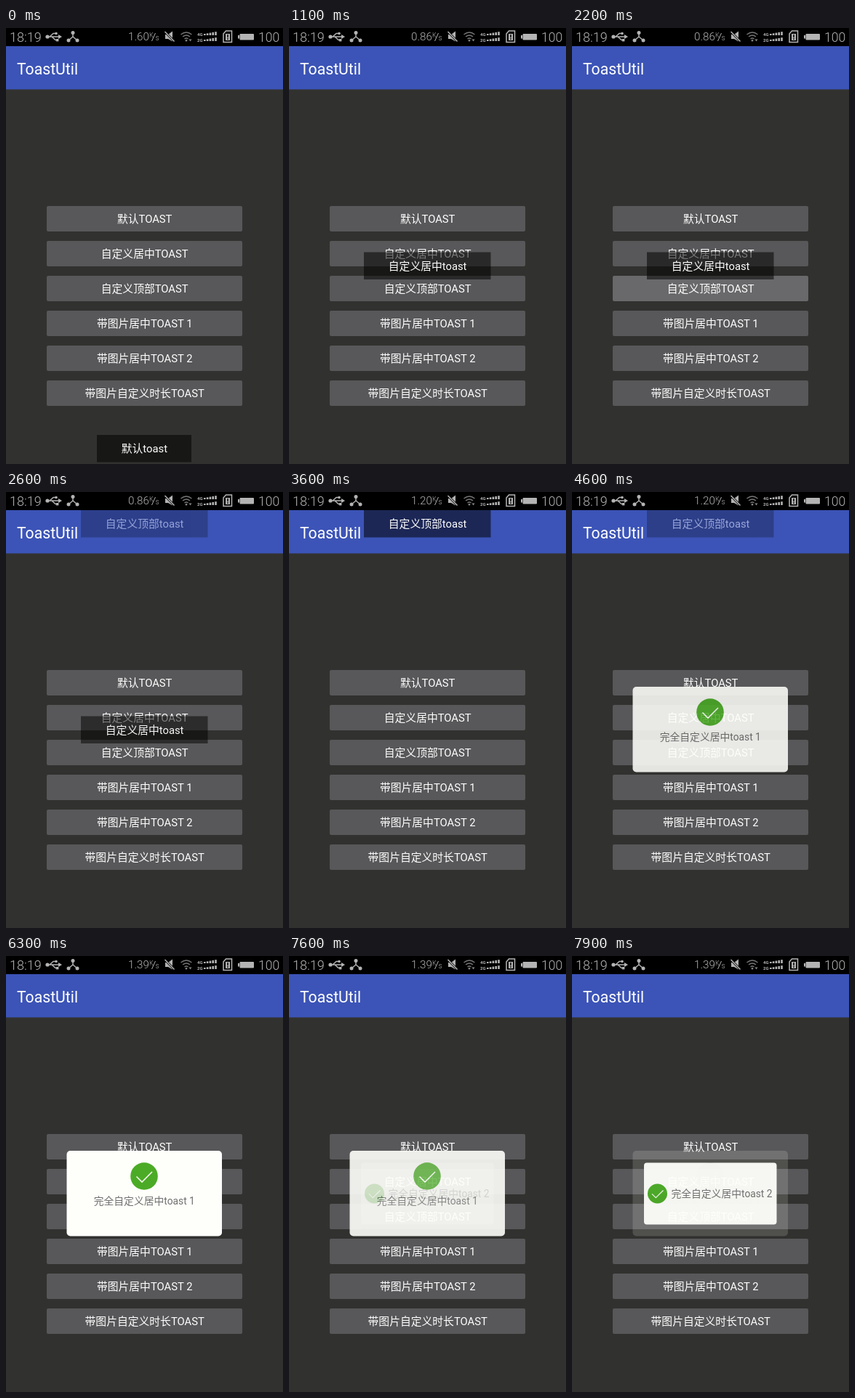
An HTML page for the animation above (8000 ms loop, 381 by 600 pixels).

```html
<!DOCTYPE html>
<html lang="zh-CN">
<head>
<meta charset="utf-8">
<style>
  html, body { margin: 0; width: 100%; height: 100%; overflow: hidden; background: #31312f; }
  svg { display: block; width: 100vw; height: 100vh; }
  text { font-family: Roboto, "Noto Sans CJK SC", "Noto Sans CJK", sans-serif; font-size: 14.8px; fill: #fff; }
  .mid { text-anchor: middle; }
  .status text { fill: #b4b4b4; font-weight: 300; }
  .status .tiny { font-size: 6px; font-weight: 700; }
  .line { fill: none; stroke: #b4b4b4; stroke-width: 1.5; }
  .card text { font-size: 13.8px; fill: #707070; }
  .card rect { fill: #fefefa; }
  .card circle { fill: #4bab26; }
  .card path { fill: none; stroke: #f4fbef; }
</style>
</head>
<body>
<svg viewBox="0 0 381 600">
  <rect width="381" height="600" fill="#31312f"/>
  <rect width="381" height="25"/>
  <rect y="25" width="381" height="59.5" fill="#3c54b7"/>
  <text x="15" y="63.5" style="font-size:21.2px">ToastUtil</text>

  <g class="status" fill="#b4b4b4">
    <text x="5" y="18.5" style="font-size:18px">18:19</text>
    <g id="usb">
      <path class="line" d="M57 12H72M60 12L65 7.5H68M63 12L68 16.5H70"/>
      <circle cx="57" cy="12" r="2.6"/><path d="M72 9L77 12L72 15Z"/>
      <circle cx="69" cy="7.5" r="1.8"/><rect x="69" y="15" width="3.4" height="3.4"/>
    </g>
    <path class="line" d="M92 6V12L86 17M92 12L98 17"/>
    <circle cx="92" cy="6.5" r="2.5"/><circle cx="86" cy="17" r="2.5"/><circle cx="98" cy="17" r="2.5"/>
    <text id="speed" x="168" y="17.3" style="font-size:15.2px"></text>
    <text x="197" y="13" style="font-size:9px">K</text>
    <path class="line" stroke-width="1" d="M200.5 18L205.5 7" style="stroke-width:1"/>
    <text x="205.5" y="17" style="font-size:10px">s</text>
    <path d="M219 9H223L229 4.5V18.5L223 15H219Z"/>
    <path d="M218 4.5L232 19" stroke="#000" stroke-width="3"/>
    <path class="line" d="M218.5 5L231.5 18.5"/>
    <path class="line" style="stroke:#777;stroke-width:1.3" d="M240.5 9Q248 3 255.5 9M243 12Q248 8 253 12M245.5 15Q248 13 250.5 15"/>
    <circle cx="248" cy="17.3" r="1.3" fill="#888"/>
    <path d="M251.5 15.5H255.5L253.5 18.5Z" fill="#888"/>
    <text class="tiny" x="263" y="10.5">4G</text>
    <text class="tiny" x="263" y="18.5">2G</text>
    <g id="bars"></g>
    <path class="line" d="M299 8L302.5 4H310.5V19.5H299Z"/>
    <path d="M302 8H308V17H302Z"/>
    <path d="M305 9V13.3M305 14.3V16" stroke="#000" stroke-width="1.5"/>
    <rect x="321.5" y="8" width="19.5" height="8.5" rx="1"/>
    <rect x="319" y="10" width="2" height="4.5"/>
    <text x="347" y="18.5" style="font-size:17.6px">100</text>
  </g>

  <g id="buttons"></g>
  <rect id="press" x="56" y="341" width="269" height="35" rx="2" fill="#fff"/>
  <g id="toasts"></g>

  <g id="card1" class="card">
    <rect x="83.5" y="268" width="213.5" height="117.5" rx="5"/>
    <circle cx="190" cy="303" r="18.8"/>
    <path stroke-width="1.6" d="M179.5 303.5L187 311L201 297"/>
    <text class="mid" x="190.3" y="342">完全自定义居中toast 1</text>
  </g>
  <g id="card2" class="card">
    <rect x="99" y="284.5" width="182.5" height="85" rx="4"/>
    <circle cx="117.5" cy="327" r="13.5"/>
    <path stroke-width="1.2" d="M110 327.3L115.3 332.7L125.5 322.5"/>
    <text class="mid" x="206" y="332">完全自定义居中toast 2</text>
  </g>
</svg>
<script>
const LOOP = 8000, STEP = 100, FADE = 400;
const $ = id => document.getElementById(id);

$("bars").innerHTML = [10, 18].map(base =>
  [0, 1, 2, 3, 4].map(i =>
    `<rect x="${272 + i * 3.8}" y="${base - 2 - i * 0.7}" width="2.6" height="${2 + i * 0.7}"/>`
  ).join("")).join("");

$("buttons").innerHTML = ["默认TOAST", "自定义居中TOAST", "自定义顶部TOAST",
  "带图片居中TOAST 1", "带图片居中TOAST 2", "带图片自定义时长TOAST"].map((label, i) => `
  <rect x="56" y="${245 + i * 48}" width="269" height="35" rx="2" fill="#58585a"/>
  <text class="mid" x="190.7" y="${268.3 + i * 48}">${label}</text>`).join("");

const toast = (id, label, x, y, width) => `<g id="${id}">
  <rect x="${x}" y="${y}" width="${width}" height="37.5" fill="#000" fill-opacity=".53"/>
  <text class="mid" x="${x + width / 2 + 0.4}" y="${y + 24.3}">${label}</text></g>`;
$("toasts").innerHTML =
  toast("standard", "默认toast", 125, 560, 130) +
  toast("center", "自定义居中toast", 103, 308.5, 174.5) +
  toast("top", "自定义顶部toast", 103, 25, 174.5);

// id: [fade-in start, fade-out start]
const popups = {
  standard: [-1000, 660],
  center: [660, 2580],
  top: [2420, 4390],
  card1: [4250, 7560],
  card2: [7520, 9000]
};
const speeds = [[6300, "1.39"], [3600, "1.20"], [900, "0.86"], [0, "1.60"]];

const ramp = (t, start, length = FADE) => Math.min(1, Math.max(0, (t - start) / length));

function draw(now) {
  const t = Math.floor(now % LOOP / STEP) * STEP;
  for (const [id, [enter, leave]] of Object.entries(popups))
    $(id).setAttribute("opacity", ramp(t, enter) * (1 - ramp(t, leave)));
  $("press").setAttribute("opacity", t < 2200 ? 0 : 0.1 * (1 - ramp(t, 2300, 300)));
  $("speed").textContent = speeds.find(([from]) => t >= from)[1];
}

let origin;
function tick(now) {
  origin ??= now;
  draw(now - origin);
  requestAnimationFrame(tick);
}
draw(0);
requestAnimationFrame(tick);
</script>
</body>
</html>
```
